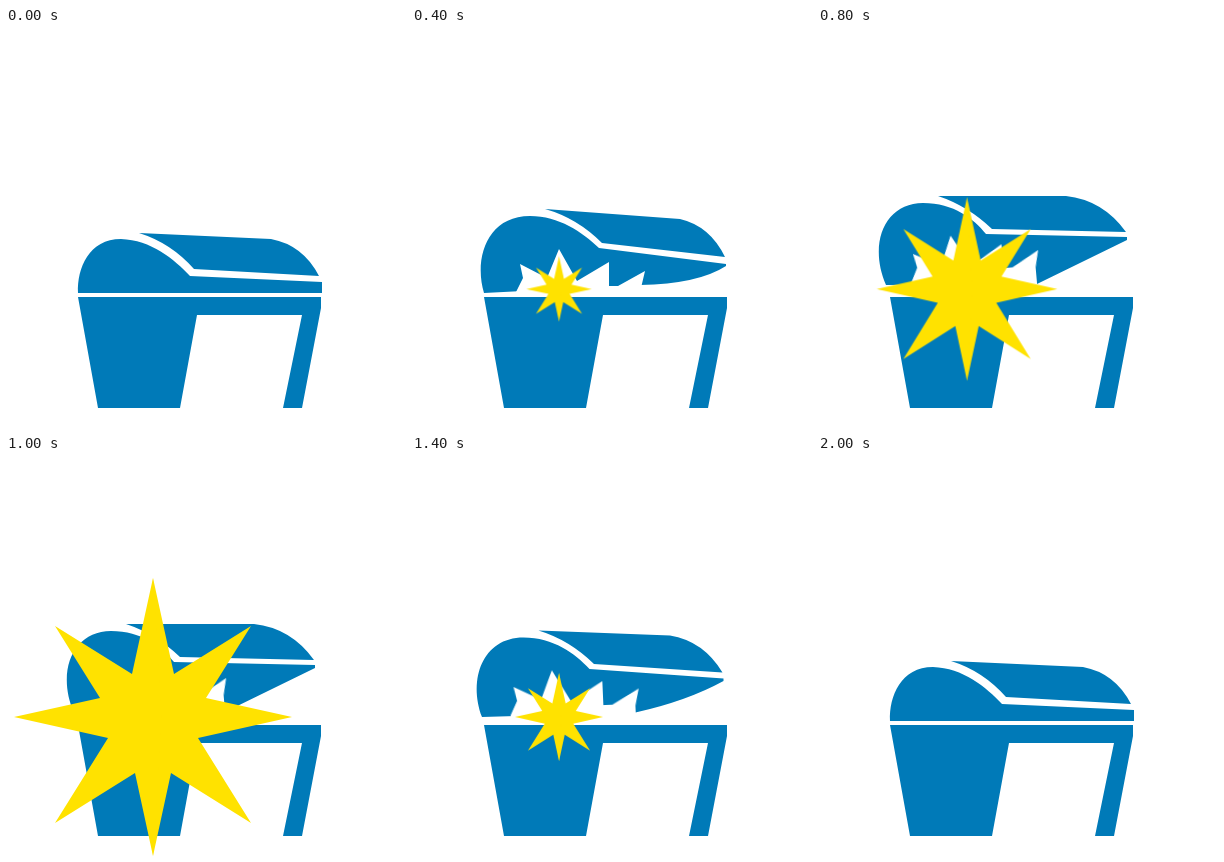
Animation of 400x400 px, one loop 2200 ms. Source, as an HTML page without scripts:

```html
<!DOCTYPE html>
<html lang="en">
<head>
<meta charset="utf-8">
<title>Treasure chest</title>
<style>
  html, body { margin: 0; width: 100%; height: 100%; overflow: hidden; background: #fff; }
  svg { display: block; width: 100%; height: 100%; }
  .chest { fill: #007ab8; }
  .mouth { fill: #fff; transform-origin: 108px 236px; }
  .star { fill: #ffe200; }

  /* Closed, ajar and open poses; steps(2) makes the one pose between each pair. */
  .shell, .cover, .mouth { animation: 2200ms steps(2) infinite; }
  .shell { animation-name: shell; }
  .cover { animation-name: cover; }
  .mouth { animation-name: mouth; }
  .star { animation: burst 2200ms step-end infinite; }

  @keyframes shell {
    0%, 90.9%, 100% { d: path("M72 265C71 240 83 211 115 211C145 212 168 231 184 248L316 254L316 265Q291 265 228 265Z"); }
    18.18%, 72.72% { d: path("M72 265C62 232 74 188 118 188C147 188 170 204 187 220L314 236L314 238Q286 256 228 257Z"); }
    36.36%, 54.54% { d: path("M68 257C50 215 67 175 105 175C136 175 156 191 168 206L309 209L309 212Q264 234 219 256Z"); }
  }
  @keyframes cover {
    0%, 90.9%, 100% { d: path("M133 205L265 211Q297 217 313 248L188 241Q165 215 133 205Z"); }
    18.18%, 72.72% { d: path("M133 181L268 191Q298 198 313 229L190 215Q165 190 133 181Z"); }
    36.36%, 54.54% { d: path("M120 168L248 168Q285 172 308 204L174 201Q150 178 120 168Z"); }
  }
  @keyframes mouth {
    0%, 90.9%, 100% { transform: translate(0, 29px) rotate(0deg) scale(1, 0); }
    18.18%, 72.72% { transform: translate(0, 0) rotate(0deg) scale(1, 1); }
    36.36%, 54.54% { transform: translate(-13px, -10px) rotate(-5deg) scale(1, 1); }
  }
  @keyframes burst {
    0%, 81.81%, 100% { transform: translate(147px, 261px) scale(0); }
    18.18%, 72.72% { transform: translate(147px, 261px) scale(.235); }
    27.27%, 63.63% { transform: translate(147px, 261px) scale(.317); }
    36.36%, 54.54% { transform: translate(149px, 261px) scale(.65, .66); }
    45.45% { transform: translate(147px, 261px) scale(1); }
  }
</style>
</head>
<body>
<svg viewBox="0 0 400 400">
  <g class="chest">
    <path class="shell"/>
    <path class="cover"/>
    <path class="mouth" d="M104 264L111 250L108 236L135 250L147 221L165 253L197 234V258H206L233 243L229 260V280H104Z"/>
    <path d="M72 269H315V280L296 380H277L296 287H191L174 380H92Z"/>
  </g>
  <g class="star">
    <!-- Right half, closed just past the axis so the mirrored half leaves no seam. -->
    <path id="half" d="M0-139L21-43L98-91L53-19L139 0L45 21L98 106L18 56L0 139L-9 0Z"/>
    <use href="#half" transform="scale(-1 1)"/>
  </g>
</svg>
</body>
</html>
```
